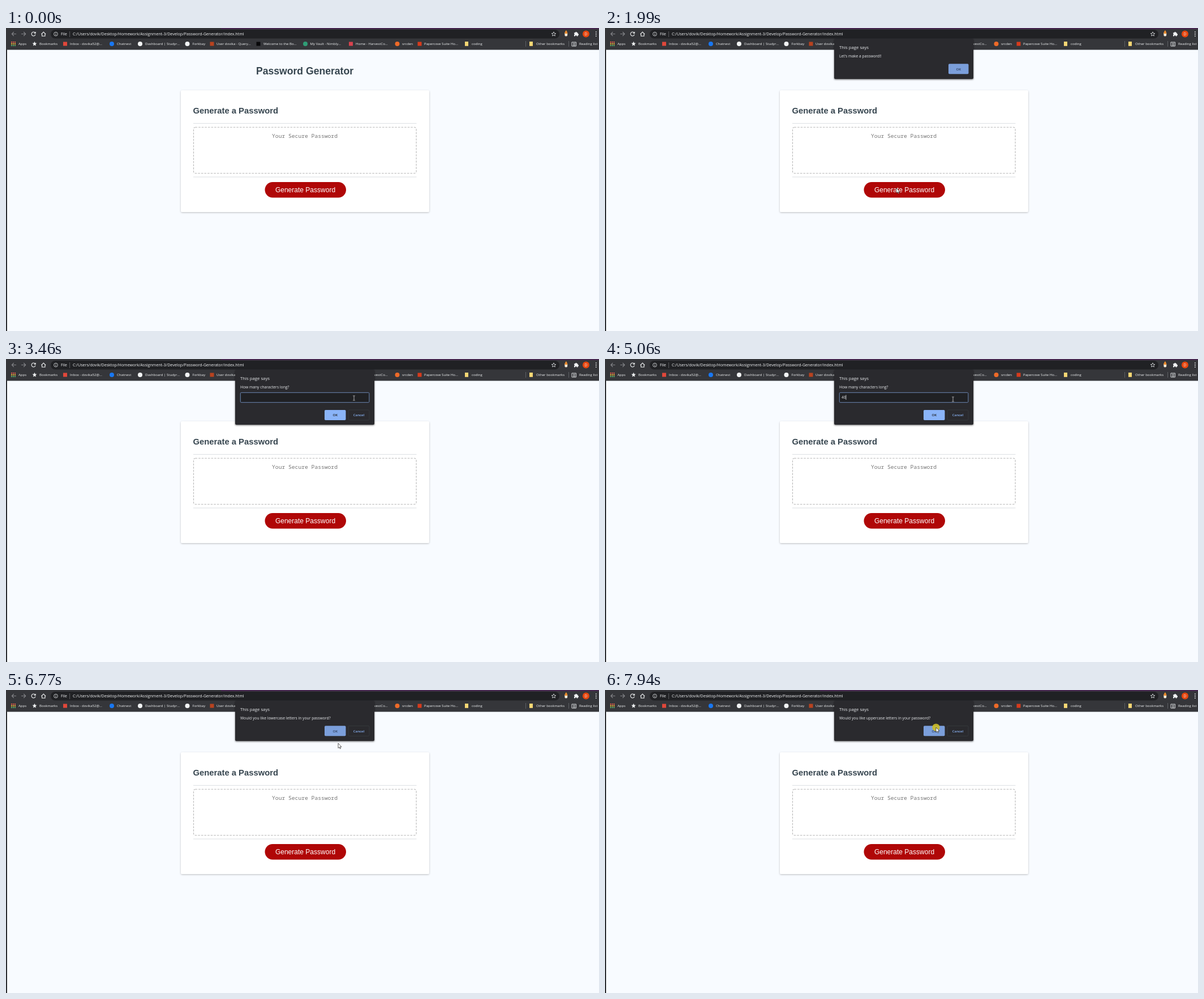
Animation, 1048 px wide and 535 px high, one loop 8 s. Source, as an HTML page:

```html
<!DOCTYPE html>
<html lang="en">
<head>
<meta charset="utf-8">
<title>Password Generator</title>
<style>
  html, body { margin: 0; width: 100%; height: 100%; overflow: hidden; background: #f8fbff; }
  svg { display: block; }
  .ui { font-family: "Open Sans", "Noto Sans", sans-serif; }
  .page { font-family: "Liberation Sans", Arial, sans-serif; }
  .mono { font-family: "Noto Sans Mono", "DejaVu Sans Mono", monospace; }
  .mid { text-anchor: middle; }
</style>
</head>
<body>
<svg width="1048" height="535" viewBox="0 0 1048 535" xmlns="http://www.w3.org/2000/svg">
  <defs>
    <filter id="soft" x="-10%" y="-20%" width="120%" height="140%">
      <feDropShadow dx="0" dy="1" stdDeviation="1.6" flood-color="#000" flood-opacity=".25"/>
    </filter>
    <filter id="deep" x="-10%" y="-20%" width="120%" height="150%">
      <feDropShadow dx="0" dy="1" stdDeviation="1.4" flood-color="#000" flood-opacity=".6"/>
    </filter>
  </defs>

  <rect width="1048" height="535" fill="#f8fbff"/>
  <rect y="38" width="1.8" height="497" fill="#17171b"/>

  <g class="page" fill="#36454f" font-weight="bold">
    <text class="mid" x="528" y="82" font-size="17.6">Password Generator</text>
    <rect x="309" y="110" width="439" height="215" rx="2.5" fill="#fff" filter="url(#soft)"/>
    <text x="330.5" y="151.3" font-size="14.8">Generate a Password</text>
  </g>
  <path d="M331 168.4H725.5M331 263H725.5" stroke="#dcdfe2"/>
  <rect x="331.5" y="175.3" width="393.6" height="81.2" rx="3" fill="none" stroke="#b9b9b9" stroke-width="1.1" stroke-dasharray="3.6 2"/>
  <text class="mono mid" x="528" y="193.8" font-size="9.67" fill="#757575">Your Secure Password</text>
  <rect x="457.5" y="272" width="143.5" height="27.5" rx="13.75" fill="#b00707"/>
  <text class="page mid" x="529" y="290" font-size="12.02" fill="#fff">Generate Password</text>

  <g id="chrome" class="ui" fill="#f1f3f4" font-size="6.1">
    <rect width="1048" height="38.5" fill="#35363a"/>
    <rect x="380" width="668" height="2" fill="#46264f"/>
    <rect x="79" y="3" width="899" height="15.5" rx="7.75" fill="#202124"/>
    <g fill="none" stroke-width="1.1">
      <path d="M18 10.5H10.3M13.8 7L10.3 10.5 13.8 14M27 10.5H34.7M31.2 7L34.7 10.5 31.2 14" stroke="#85868a"/>
      <path d="M51.6 8.7A3.5 3.5 0 1 0 52 11.4M52.2 6.7V9.3H49.5M62.4 10.8L66.3 7 70.2 10.8M63.6 10V14.2H69V10" stroke="#f1f3f4"/>
      <circle cx="88" cy="10.6" r="3.4" stroke="#e8eaed" stroke-width=".8"/>
      <path d="M88 10.2V12.5M88 8.6V9.4" stroke="#e8eaed" stroke-width=".9"/>
      <path d="M112.6 6V16M918.5 23V33M994.5 23V33" stroke="#6a6b70" stroke-width=".8"/>
      <path id="outlineStar" stroke="#e8eaed" stroke-width=".8"/>
      <path d="M1000 25H1007.5V32H1000ZM1002 27H1006M1002 29H1006M1002 31H1006" stroke="#e8eaed" stroke-width=".9"/>
    </g>
    <text x="97" y="13" font-size="6.9">File</text>
    <text x="118" y="13.1" font-size="7.1">C:/Users/dovik/Desktop/Homework/Assignment-3/Develop/Password-Generator/index.html</text>
    <rect x="987.4" y="7" width="4.8" height="7.6" rx="2.2" fill="#f4ead8"/>
    <path d="M987.4 10V8.8Q990-.5 992.2 8.8V10Z" fill="#e88a2c"/>
    <path d="M1004 8.3H1006A1.5 1.5 0 0 1 1009 8.3H1010.6V10A1.5 1.5 0 0 1 1010.6 13V14.4H1008.6A1.3 1.3 0 0 0 1006 14.4H1004V12.3A1.4 1.4 0 0 0 1004 9.8Z"/>
    <circle cx="1025" cy="10.5" r="6" fill="#e8470f"/>
    <text class="mid" x="1025" y="13" font-size="6.6">D</text>
    <path d="M1042 6.2h1.6v1.6h-1.6zM1042 9.8h1.6v1.6h-1.6zM1042 13.4h1.6v1.6h-1.6z"/>
    <path id="solidStar"/>
  </g>

  <g id="dialogs" class="ui"></g>
  <circle id="click" r="6.6" fill="#cdbd27" opacity=".9"/>
  <g id="cursor" stroke-linejoin="round">
    <path id="arrow" d="M0 0V8.6L2 6.9 3.3 9.8 4.6 9.2 3.3 6.4H5.9Z" fill="#fff" stroke="#222" stroke-width=".7"/>
    <path id="hand" d="M-1 .6Q0-.7 1 .6V3.9L4.4 4.8Q5.4 5.2 5.2 6.5L4.3 11H-.6L-3.1 7.2Q-3.2 6-2 6.2L-1 7.2Z" fill="#fff" stroke="#222" stroke-width=".7"/>
    <path id="ibeam" d="M-1.8-4H-.5L0-3.6.5-4H1.8M0-3.6V3.6M-1.8 4H-.5L0 3.6.5 4H1.8" fill="none" stroke="#d5d5d5" stroke-width=".8"/>
  </g>
</svg>

<script>
const $ = id => document.getElementById(id);
const LOOP = 8000;

// Browser bar
const star = (cx, cy, r) => 'M' + Array.from({ length: 10 }, (_, i) => {
  const a = i * Math.PI / 5, k = i % 2 ? r * .45 : r;
  return `${cx + k * Math.sin(a)} ${cy - k * Math.cos(a)}`;
}).join('L') + 'Z';
$('outlineStar').setAttribute('d', star(968, 10.8, 4));
$('solidStar').setAttribute('d', star(50.5, 28, 4.2));

const dot = color => x => `<circle cx="${x}" cy="28" r="4" fill="${color}"/>`;
const box = color => x => `<rect x="${x - 3.5}" y="24.5" width="7" height="7" fill="${color}"/>`;
const folder = x => `<path d="M${x - 3} 24h6v7.8h-6z" fill="#f7d774"/>`;
const none = () => '';
const apps = x => ['#e8604c', '#f0b93a', '#5fae6a'].map((c, i) => [-3, 0, 3].map(d =>
  `<rect x="${x + d - 1}" y="${24 + i * 3}" width="2" height="2" fill="${c}"/>`).join('')).join('');

const bookmarks = [
  [13, 22, 'Apps', apps], [50, 59, 'Bookmarks', none],
  [104.5, 113, 'Inbox - dovika52@...', box('#e0473a')],
  [187, 196, 'Chatnest', dot('#1877f2')],
  [237, 246, 'Dashboard | Studyr...', dot('#f1f3f4')],
  [320.5, 329.5, 'Forkbay', dot('#f1f3f4')],
  [364, 372, 'User dovika - Query...', box('#b8431f')],
  [446, 455, 'Welcome to the Bo...', box('#08080a')],
  [529, 537.5, 'My Vault - Nimbly...', dot('#2f9d76')],
  [609.5, 618, 'Home - HarvestCo...', box('#d8434e')],
  [691.5, 700, 'srcden', dot('#ee6a28')],
  [731, 739, 'Papercove Suite Ho...', box('#d83b1c')],
  [814, 823, 'coding', folder], [928, 937, 'Other bookmarks', folder],
  [1003, 1013, 'Reading list', none],
];
$('chrome').insertAdjacentHTML('beforeend', bookmarks.map(([ix, tx, label, icon]) =>
  icon(ix) + `<text x="${tx}" y="30.2">${label}</text>`).join(''));

// Dialogs
const button = (x, y, w, label, fill, ink, stroke = 'none') =>
  `<rect x="${x}" y="${y}" width="${w}" height="18" rx="1.8" fill="${fill}" stroke="${stroke}" stroke-width=".7"/>
   <text class="mid" x="${x + w / 2}" y="${y + 11.2}" font-size="6.1" font-weight="600" fill="${ink}">${label}</text>`;
const cancel = y => button(605, y, 37, 'Cancel', 'none', '#8ab4f8', '#3c4043');
const dialog = (id, bottom, message, body) => `<g id="${id}">
  <rect x="405" y="19" width="246" height="${bottom - 19}" rx="2" fill="#292a2d" filter="url(#deep)"/>
  <text x="414" y="36.5" font-size="7.75" fill="#e8eaed">This page says</text>
  <text x="414" y="52" font-size="6.75" fill="#e8eaed">${message}</text>${body}</g>`;
const ask = (id, kind) => dialog(id, 90, `Would you like ${kind} letters in your password?`,
  button(563, 63.3, 37.5, 'OK', '#7b9fdb', '#30405e') + cancel(63.3));

$('dialogs').innerHTML =
  dialog('alert', 90, "Let's make a password!!", button(607, 63.3, 35.5, 'OK', '#7b9fdb', '#30405e')) +
  dialog('prompt', 116, 'How many characters long?',
    `<rect x="414.3" y="59.3" width="227.6" height="17.4" rx="1.5" fill="#202124" stroke="#6c87b4"/>
     <text id="typed" x="418" y="70.2" font-size="6.5" fill="#e8eaed"></text>
     <path id="caret" d="M0 63.5V72" stroke="#e8eaed" stroke-width=".8"/>` +
    button(563, 90, 37.5, 'OK', '#8ab4f8', '#202124') +
    '<rect id="hover" x="571" y="90" width="29.5" height="18" rx="1.8" fill="#202124" opacity=".13"/>' + cancel(90)) +
  ask('lower', 'lowercase') + ask('upper', 'uppercase');

// Each row: time, opacity, vertical offset
const fades = {
  alert: [[0, 0, 0], [1290, .3, -8], [1380, .72, -5], [1450, .93, -2], [1530, 1, 0], [2850, 1, -.5], [2940, 1, -1], [3010, 0, 0]],
  prompt: [[0, 0, 0], [2940, .04, -3], [3010, .9, -2], [3090, 1, 0], [6380, 0, 0]],
  lower: [[0, 0, 0], [6380, .85, -3], [6460, 1, 0], [7330, 0, 0]],
  upper: [[0, 0, 0], [7330, .4, -7], [7400, .75, -5], [7480, .93, -2], [7560, 1, 0]],
};
const typing = [[0, ''], [4710, '4'], [5060, '40']];
const caretOn = [[0, 1], [3460, 0], [3930, 1], [4490, 0], [4710, 1], [5590, 0], [6120, 1]];
const clicks = [[1140, 1290], [2690, 2770], [6300, 6380], [7170, 7250], [7940, LOOP]];

// Pointer moves: start, end, points along the way
const moves = [
  [370, 1060, [[1040, 528], [515, 281]]],
  [1840, 2630, [[515, 282], [517, 291], [600, 150], [615, 67]]],
  [2940, 2940, [[615, 69]]],
  [3460, 3620, [[615, 69], [615, 71]]],
  [5440, 6230, [[615, 71], [612, 51], [600, 75], [587, 100.5]]],
  [6770, 7090, [[587, 94], [585, 66]]],
];
const shapes = [[0, ''], [370, 'arrow'], [980, 'hand'], [1840, 'arrow'], [2940, 'ibeam'],
  [5520, 'arrow'], [5750, 'ibeam'], [5900, 'arrow'], [6060, 'hand'], [6770, 'arrow']];

const last = (rows, t) => rows.findLast(row => row[0] <= t);

function pointer(t) {
  const [from, to, pts] = last(moves, t) || moves[0];
  const held = Math.floor((t - from) / 78) * 78;
  const u = to > from ? Math.min(1, Math.max(0, held / (to - from))) : 0;
  const s = u * u * (3 - 2 * u) * (pts.length - 1);
  const i = Math.min(Math.floor(s), Math.max(0, pts.length - 2));
  const a = pts[i], b = pts[i + 1] || a;
  return a.map((v, k) => v + (b[k] - v) * (s - i));
}

function draw(t) {
  for (const id in fades) {
    const [, alpha, dy] = last(fades[id], t);
    $(id).setAttribute('opacity', alpha);
    $(id).setAttribute('transform', `translate(0 ${dy})`);
  }
  const text = last(typing, t)[1];
  $('typed').textContent = text;
  $('caret').setAttribute('transform', `translate(${418.5 + text.length * 3.7} 0)`);
  $('caret').setAttribute('opacity', last(caretOn, t)[1]);
  $('hover').setAttribute('visibility', t >= 6060 ? 'inherit' : 'hidden');

  const place = `translate(${pointer(t)})`;
  const shape = last(shapes, t)[1];
  for (const id of ['arrow', 'hand', 'ibeam'])
    $(id).setAttribute('visibility', id === shape ? 'visible' : 'hidden');
  $('ibeam').setAttribute('stroke', t < 3010 ? '#4f5560' : '#d5d5d5');
  $('cursor').setAttribute('transform', place);
  $('click').setAttribute('transform', place);
  $('click').setAttribute('visibility', clicks.some(([a, b]) => t >= a && t < b) ? 'visible' : 'hidden');
}

const start = performance.now();
function tick() {
  draw((performance.now() - start) % LOOP);
  requestAnimationFrame(tick);
}
tick();
</script>
</body>
</html>
```
